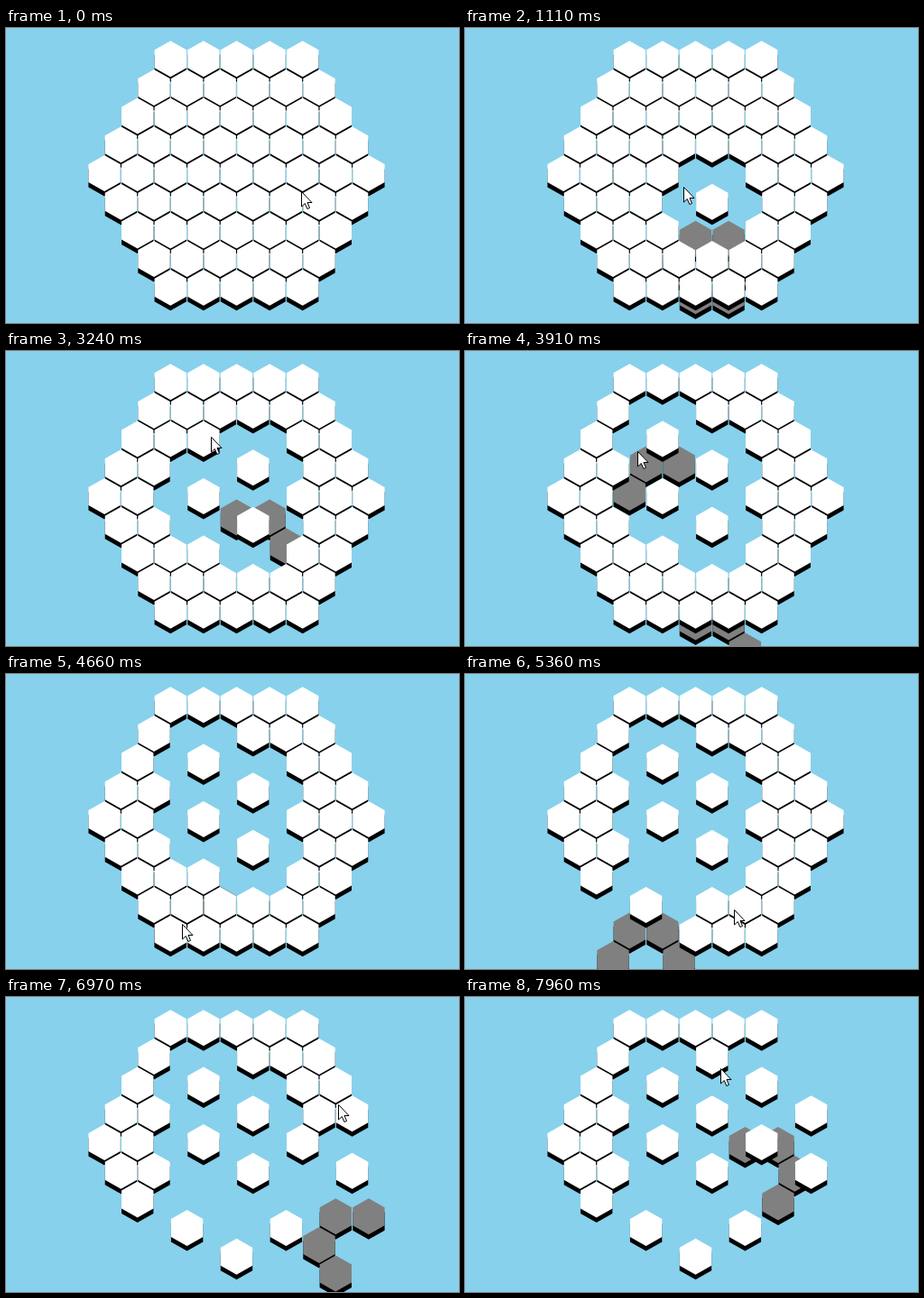
An HTML page with a canvas for the animation above (7.99 s loop, 502 by 327 pixels).

```html
<!DOCTYPE html>
<html lang="en">
<head>
<meta charset="utf-8">
<title>Hex tiles</title>
<style>
html, body { margin: 0; width: 100%; height: 100%; overflow: hidden; background: #87d1ec; }
canvas { display: block; width: 502px; height: 327px; }
</style>
</head>
<body>
<canvas id="stage" width="502" height="327"></canvas>
<script>
const ctx = document.getElementById('stage').getContext('2d');
const LOOP = 7990;
const CX = 255.5, CY = 161;        // centre of the board
const HALF_COL = 18.3, ROW = 31.7; // half a column step, full row step
const R = 20, W = 17.7;            // tile half height and half width
const DEPTH = 5.5;
const SPEED = 0.173;               // fall, px per ms

// Clicked tiles: time, half-column, row. All their neighbours drop.
const clicks = [
  [690, 1, 5], [1803, -2, 4], [2738, 1, 3], [3567, -2, 2],
  [5013, -3, 7], [5743, 3, 7], [6496, 7, 5], [7394, 4, 2]
];

// Key points of the pointer: time, x, y.
const path = [
  [100, 327, 181], [510, 280, 191], [690, 280, 191], [1450, 204, 157],
  [2040, 203, 133], [2700, 270, 122], [3240, 227, 95], [3800, 208, 97],
  [4260, 134, 186], [4660, 195, 277], [5500, 317, 254], [6090, 387, 195],
  [6500, 387, 195], [6970, 368, 119], [7390, 332, 98], [7960, 283, 79]
];

const arrow = [[0, 0], [0, 16.5], [3.8, 13], [6.4, 19], [9, 17.9], [6.5, 12], [11.5, 12]];

function isNeighbour(u, r, cu, cr) {
  const du = Math.abs(u - cu), dr = Math.abs(r - cr);
  return (dr === 0 && du === 2) || (dr === 1 && du === 1);
}

const cells = [];
for (let r = 0; r < 9; r++) {
  const n = 9 - Math.abs(r - 4);
  for (let u = 1 - n; u < n; u += 2) {
    const hit = clicks.find(([, cu, cr]) => isNeighbour(u, r, cu, cr));
    cells.push({ x: CX + u * HALF_COL, y: CY + (r - 4) * ROW, start: hit ? hit[0] : Infinity });
  }
}

function polygon(points, x, y, color) {
  ctx.beginPath();
  for (const [px, py] of points) ctx.lineTo(x + px, y + py);
  ctx.closePath();
  ctx.fillStyle = color;
  ctx.fill();
}

const hex = [[0, -R], [W, -R / 2], [W, R / 2], [0, R], [-W, R / 2], [-W, -R / 2]];

function tile(x, y, color) {
  polygon(hex, x, y + DEPTH, '#000');
  polygon(hex, x, y, color);
}

// Tangent at a key point; zero at ends, rests and turning points.
function slope(i, k) {
  const a = path[i - 1], b = path[i], c = path[i + 1];
  if (!a || !c || (b[k] - a[k]) * (c[k] - b[k]) <= 0) return 0;
  return (c[k] - a[k]) / (c[0] - a[0]);
}

function pointer(time) {
  const last = path.length - 1;
  const t = Math.min(Math.max(time, path[0][0]), path[last][0]);
  let i = 0;
  while (i < last - 1 && path[i + 1][0] <= t) i++;
  const a = path[i], b = path[i + 1], span = b[0] - a[0];
  const s = (t - a[0]) / span, q = 1 - s;
  return [1, 2].map(k =>
    a[k] * q * q * (1 + 2 * s) + b[k] * s * s * (3 - 2 * s) +
    span * s * q * (slope(i, k) * q - slope(i + 1, k) * s));
}

function draw(t) {
  ctx.fillStyle = '#87d1ec';
  ctx.fillRect(0, 0, 502, 327);
  for (const c of cells) {
    if (t >= c.start) tile(c.x, c.y + (t - c.start) * SPEED, '#808080');
  }
  for (const c of cells) {
    if (t < c.start) tile(c.x, c.y, '#fff');
  }
  const [x, y] = pointer(t).map(Math.round);
  polygon(arrow, x + 0.5, y + 0.5, '#fff');
  ctx.strokeStyle = '#000';
  ctx.stroke();
}

const begin = performance.now();
function tick() {
  draw((performance.now() - begin) % LOOP);
  requestAnimationFrame(tick);
}
tick();
</script>
</body>
</html>
```
